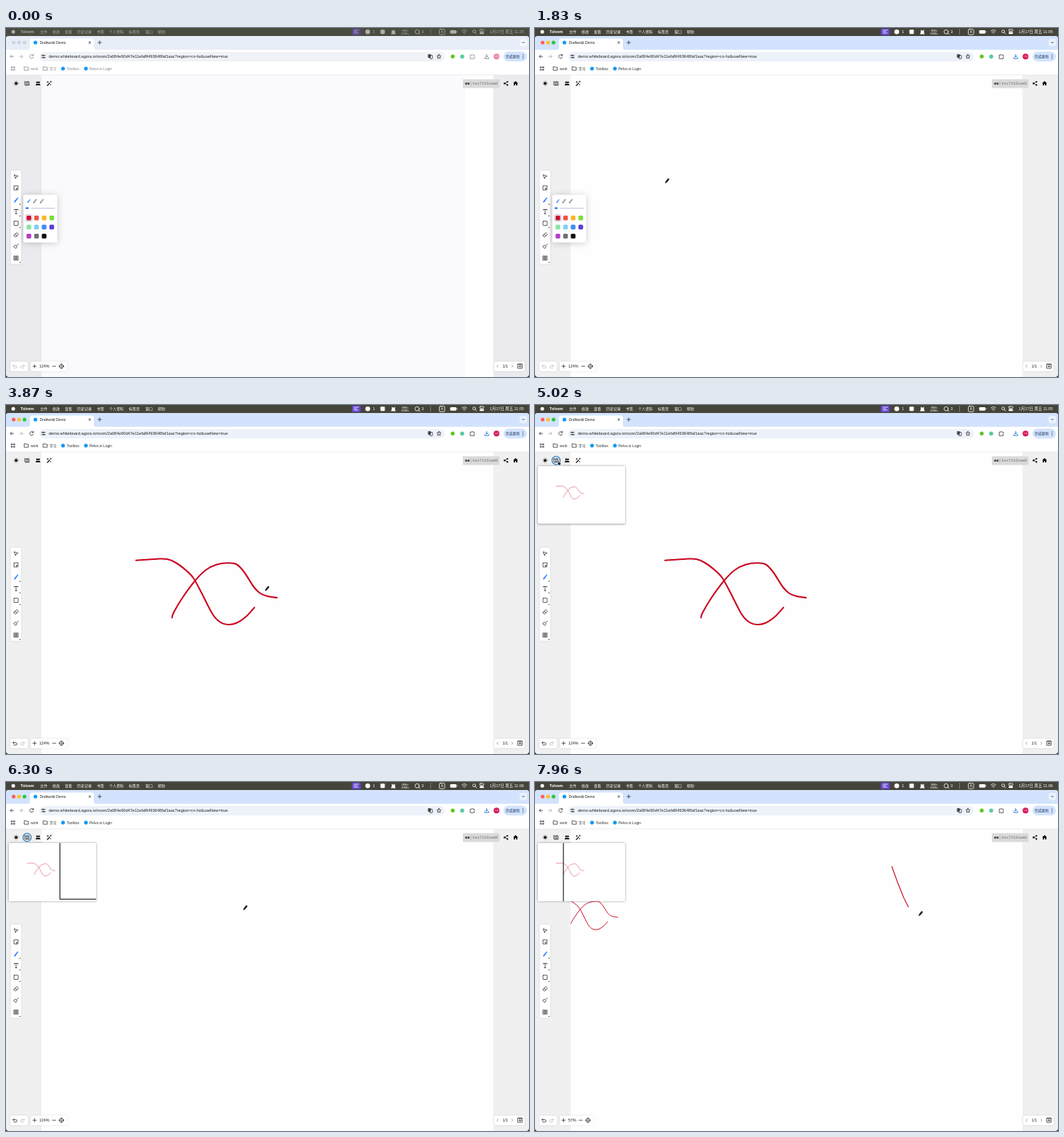
These frames come from a looping animation (720 px wide and 480 px high, 8000 ms). An HTML page:

```html
<!DOCTYPE html>
<html lang="zh">
<head>
<meta charset="utf-8">
<title>Whiteboard</title>
<style>
html, body { margin: 0; width: 100%; height: 100%; overflow: hidden; background: #222; }
svg {
  display: block; width: 720px; height: 480px;
  font: 5.4px "Liberation Sans", "Noto Sans CJK SC", sans-serif;
  --menu: #45443a; --tabs: #d3e3fd; --pill: #edf2fa; --side: #f0f0f0; --board: #fefefe;
  --ink: #303236; --dim: 1; --get: #1a66d8; --face: #d81b60;
}
svg.idle { --tabs: #e6ebf2; --pill: #eff2f7; --side: #efefef; --board: #fdfdfd; --ink: #85888c; --dim: .75; --get: #777; --face: #ee86ae; }
svg.pale { --menu: #4a4c40; --tabs: #e8eef8; --side: #ebebef; --board: #fafafd; --dim: .55; }
text { white-space: pre; }
.w { fill: #fff; }
.ink { fill: var(--ink); }
.l { fill: none; stroke: #222; stroke-width: .75; stroke-linecap: round; stroke-linejoin: round; }
.li { fill: none; stroke: var(--ink); stroke-width: .8; stroke-linecap: round; stroke-linejoin: round; }
.lw { fill: none; stroke: #fff; stroke-width: .8; stroke-linecap: round; }
.off { stroke: #bbb; }
.pen { fill: none; stroke: #cb0420; stroke-width: 2.1; stroke-linecap: round; stroke-linejoin: round; }
.panel { fill: #fff; filter: drop-shadow(0 .5px 1px #0002); }
.mono { font: 5.3px "Liberation Mono", monospace; }
.idle .lights { fill: #d0d6dd; }
</style>
</head>
<body>
<svg id="stage" viewBox="0 0 720 480" xmlns="http://www.w3.org/2000/svg">
<defs>
  <clipPath id="boardClip"><rect x="49" y="65" width="622" height="415"/></clipPath>
  <clipPath id="mapClip"><rect x="4" y="84" width="120" height="80"/></clipPath>
  <path id="pencil" d="M-1.2 3.2 2.6-2.2Q3.4-3.4 1.9-3.4L-2.4 1.4-3 3.4Z" />
</defs>
<rect width="720" height="480" fill="#222"/>
<rect width="720" height="20" fill="var(--menu)"/>

<!-- menu bar -->
<g class="w" opacity="var(--dim)" style="opacity:var(--dim)">
  <circle cx="10" cy="5.2" r="2.5"/>
  <text x="20" y="7.2" font-weight="bold">Tolvem</text>
  <g id="menus" font-size="5"></g>
  <rect x="476" y=".7" width="12.5" height="9.3" rx="2" fill="#6446c8"/>
  <path class="lw" d="M479 3h6.500M479 5h4M479 7h6"/>
  <circle cx="498" cy="5.2" r="3.3"/>
  <text x="505" y="7.2">1</text>
  <rect x="515.500" y="2.300" width="6" height="6" rx="1"/>
  <path d="M531 2l1 1.500h2.500l1-1.500v4l1 2.500h-6.500l1-2.500z"/>
  <text x="545" y="4.800" font-size="3.300">0KB/s</text>
  <text x="544" y="8.600" font-size="3.300">26KB/s</text>
  <circle class="lw" cx="566" cy="5.200" r="2.900"/><path class="lw" d="M568 7.500l2 1"/>
  <text x="572" y="7.200">3</text>
  <path class="lw" d="M584.500 2.500v.2m0 2.500v.2m0 2.500v.2" />
  <rect class="lw" x="596.500" y="1.700" width="7.500" height="7.500" rx="1.500"/>
  <text x="598.500" y="7.200">A</text>
  <rect x="611.500" y="3" width="8.500" height="4.800" rx="1.200"/><path class="lw" d="M621 4.700v1.200"/>
  <path class="lw" d="M627.600 4q3.400-3 6.800 0M629 5.800q2-1.700 4 0M630.800 7.500h.4"/>
  <circle class="lw" cx="644.500" cy="4.700" r="2"/><path class="lw" d="M646 6.300l2 2"/>
  <rect class="lw" x="652" y="2" width="6" height="2.500" rx="1.200"/><rect x="652" y="5.600" width="6" height="2.700" rx="1.300"/>
  <text x="666" y="7.200" id="clock"></text>
</g>

<!-- browser window -->
<rect y="11" width="720" height="469" rx="4" fill="var(--side)"/>
<path d="M0 30V15Q0 11 4 11H716Q720 11 720 15V30Z" fill="var(--tabs)"/>
<rect y="30" width="720" height="34.500" class="w"/>
<path d="M0 64.700H720" stroke="#e3e5e8" stroke-width=".6"/>
<circle class="lights" cx="10.500" cy="20" r="2.600" fill="#fe5f57"/>
<circle class="lights" cx="18" cy="20" r="2.600" fill="#febc2e"/>
<circle class="lights" cx="25.500" cy="20" r="2.600" fill="#28c840"/>
<path class="w" d="M30 30Q33 30 33 27V18Q33 14.500 36.500 14.500H117.500Q121 14.500 121 18V27Q121 30 124 30Z"/>
<circle cx="40.500" cy="20" r="2.600" fill="#1599f5"/>
<text x="46.500" y="21.900" font-size="5" fill="#222">Draftwold Demo</text>
<path class="l" d="M114 18.700l2.600 2.600m0-2.600l-2.600 2.600M126.700 20h4.600m-2.300-2.300v4.600"/>
<rect x="707" y="15" width="10.500" height="10" rx="3" fill="#fff8"/>
<path class="l" d="M710.800 19.300l1.500 1.500 1.500-1.500"/>

<path class="li" d="M10.500 39.200H6m2-2-2 2 2 2"/>
<path class="li" style="stroke:#aaa" d="M18.500 39.200H23m-2-2 2 2-2 2"/>
<path class="li" d="M37.500 37.700a2.600 2.600 0 1 0 .2 2.500M37.800 36v2h-2"/>
<rect x="46" y="33" width="558" height="13" rx="6.500" fill="var(--pill)"/>
<path class="l" d="M49 37.700h1m2 0h2M49 40.700h2m2 0h1"/><circle class="l" cx="51" cy="37.700" r=".8"/><circle class="l" cx="52" cy="40.700" r=".8"/>
<text x="59" y="41.100" font-size="5.620" fill="#222">demo.whiteboard.agora.io/room/2a084e90d47e11efaf9493648faf1aac?region=cn-hz&amp;useNew=true</text>
<rect x="580.800" y="36" width="4" height="5" rx=".7" fill="#555"/><rect class="l" x="583.500" y="37.500" width="3.500" height="4.800" rx=".5"/>
<path class="l" d="M596 36.300l.9 1.900 2 .2-1.500 1.400.4 2.100-1.800-1-1.800 1 .4-2.100-1.500-1.400 2-.2z"/>
<circle cx="615" cy="39.200" r="2.600" fill="#5cc51c"/>
<circle cx="628" cy="39.200" r="2.800" fill="#5bcaa4"/>
<path class="li" d="M639.500 37.200h1.700q.8-2 1.600 0h1.700v1.600q1.500.7 0 1.400v2h-5z"/>
<path d="M661.800 36v4m-1.700-1.600 1.700 1.700 1.700-1.700M659 40.300v1.700h5.600v-1.700" fill="none" stroke="var(--get)" stroke-width=".9"/>
<circle cx="675.300" cy="39.200" r="4" fill="var(--face)"/>
<text x="672.800" y="40.400" font-size="2.600" class="w">小文</text>
<rect x="685" y="32.500" width="32" height="13.500" rx="6.700" fill="#d3e3fd"/>
<text x="687.800" y="41.100" font-size="4.900" fill="#19375e">完成更新</text>
<path d="M711.800 36.800v.1m0 2.300v.1m0 2.300v.1" stroke="#19375e" stroke-width="1.200" stroke-linecap="round"/>

<!-- bookmarks -->
<path class="li" d="M7.500 53.500h1.300v1.300H7.500zm3.300 0h1.300v1.300h-1.300zm-3.300 3.300h1.300v1.300H7.500zm3.300 0h1.300v1.300h-1.300z"/>
<path class="li" d="M25.500 53.300h2l.7.800h2.700v4h-5.400zM51.500 53.300h2l.7.800h2.700v4h-5.400z"/>
<circle cx="78.500" cy="55.800" r="2.600" fill="#1599f5"/><circle cx="110" cy="55.800" r="2.600" fill="#1599f5"/>
<g class="ink" font-size="5">
  <text x="34" y="57.600">work</text><text x="60" y="57.600" font-size="4.700">学习</text>
  <text x="83.500" y="57.600">Toolbox</text><text x="114.700" y="57.600">Pelvo.io Login</text>
</g>

<!-- board -->
<rect x="49" y="65" width="622" height="415" fill="var(--board)"/>
<rect id="strip" x="632" y="65" width="39" height="415" fill="#fff"/>
<g clip-path="url(#boardClip)">
  <g id="world"><path id="wave" class="pen" pathLength="1"/><path id="hill" class="pen" pathLength="1"/></g>
  <path id="slash" class="pen" style="stroke-width:1.100" d="M491.300 116.300Q499 139 508 160L514 171.700" pathLength="1"/>
</g>

<!-- top controls -->
<g>
  <circle id="ring" cx="29" cy="76.200" r="5.600" fill="#e9f1fc" stroke="#2a78bd" stroke-width="1.200"/>
  <circle cx="14" cy="76.200" r="1.900"/><circle cx="14" cy="76.200" r="3" fill="none" stroke="#111" stroke-width="1" stroke-dasharray=".7 1.656"/>
  <path class="l" d="M26.200 73.700l1.800.7 2-.7 1.900.7v4.600l-1.900-.7-2 .7-1.800-.7zM28 74.400v4.500m2-5.200v4.500"/>
  <circle cx="42.800" cy="74.800" r="1.200"/><circle cx="45.400" cy="74.800" r="1.200"/><path d="M40.700 78.800q0-2 2-2h2.700q2 0 2 2z"/>
  <path d="M56.500 79.500l4-4" stroke="#111" stroke-width="1.300"/><path class="l" d="M57.500 73.400v1.800m-.9-.9h1.800M61.700 73v1.600m-.8-.8h1.600M61.500 77.500v1"/>
  <rect x="629" y="70.500" width="50.500" height="12" rx="1" fill="#dadada"/>
  <text class="mono" x="632" y="78.200" font-weight="bold" style="font-weight:bold">ee</text>
  <path d="M640 73.500v6" stroke="#888" stroke-width=".5"/>
  <text class="mono" x="642.300" y="78.200" fill="#777">kex7tb3owm8</text>
  <path class="l" d="M690.200 74.200l-3.700 2 3.700 2"/><circle cx="690.300" cy="74" r="1.100"/><circle cx="686.300" cy="76.200" r="1.200"/><circle cx="690.300" cy="78.400" r="1.100"/>
  <path d="M701.500 73l3.300 3h-.8v3h-1.700v-2h-1.600v2H699v-3h-.8z"/>
</g>

<!-- minimap -->
<g id="map">
  <rect x="4" y="84" width="120" height="80" class="w" style="filter:drop-shadow(0 .5px 1.500px #0006)"/>
  <g clip-path="url(#mapClip)">
    <use id="mini" href="#world"/>
    <rect id="view" fill="none" stroke="#222" stroke-width="1.200"/>
  </g>
</g>

<!-- tool column -->
<rect class="panel" x="6.500" y="196" width="14.500" height="128.500" rx="2"/>
<g class="l">
  <path d="M11.500 202l5 1.700-2.200.9-.9 2.200z"/>
  <path stroke-dasharray="1 .7" d="M16.500 219.500v-2.500h-5.500v5.800h2.500"/><path d="M14.300 220.300l2.800 1-1.300.5-.5 1.200z"/>
  <path d="M11.300 250.300v-.8h5.200v.8M13.900 249.500v6m-1 0h2"/>
  <rect x="11" y="265.700" width="5.800" height="5.800" rx=".5"/>
  <path d="M11.200 285l3-3q.8-.7 1.500 0l.9.900q.6.600 0 1.300l-3 3h-1.400l-1-1q-.6-.6 0-1.200zM12.600 283.600l2.400 2.400"/>
  <path d="M17 297l-2.500 2.500M13.300 298.800l2 2-1.800 2.500-2.800-2.500z"/>
  <path d="M11.200 313.700h2.200v2.200h-2.200zm3.300 0h2.200v2.200h-2.200zm-3.300 3.300h2.200v2.200h-2.200zm3.300 0h2.200v2.200h-2.200z"/>
</g>
<use href="#pencil" x="14" y="236.500" fill="#3381ff"/>
<path d="M19.800 241.500v1.600h-1.600zm0 16v1.600h-1.600zm0 16v1.600h-1.600zm0 48v1.600h-1.600z"/>

<!-- pen options -->
<g id="popup">
  <rect x="24" y="229.500" width="46.500" height="65.500" rx="2" class="w" style="filter:drop-shadow(0 1px 5px #0003)"/>
  <use href="#pencil" transform="translate(31.500 238) scale(.75)" fill="#3381ff"/>
  <use href="#pencil" transform="translate(40 238) scale(.7)" class="l"/>
  <use href="#pencil" transform="translate(49.300 238) scale(.7)" class="l"/>
  <rect x="28" y="246.900" width="39.500" height="2" rx="1" fill="#dcdfe6"/>
  <rect x="27" y="246.500" width="4.500" height="2.500" rx="1" fill="#3381ff"/><circle cx="32.800" cy="247.800" r="1.800" class="w"/>
  <rect x="27" y="256.700" width="9" height="9" rx="1.800" fill="#fff" stroke="#8a9bbd" stroke-width=".6"/>
  <g id="swatches"></g>
</g>

<!-- bottom bars -->
<rect class="panel" x="6" y="458.700" width="24" height="13.300" rx="2"/>
<path id="undo" class="l" d="M11 463l-1.500 1.500 1.500 1.500M9.700 464.500h3.500q2 0 2 1.700t-2 1.500h-2.500"/>
<path class="l off" d="M24.200 463l1.500 1.500-1.500 1.500M25.500 464.500H22q-2 0-2 1.700t2 1.500h2.500"/>
<rect id="zoomBox" class="panel" x="34" y="458.700" width="50" height="13.300" rx="2"/>
<path class="l" d="M37 465.200h4.600m-2.300-2.300v4.600"/>
<text id="zoom" x="45.700" y="467.200" font-size="5.500" fill="#222"></text>
<g id="zoomEnd"><path class="l" d="M64 465.200h4.500M76.300 461.800v1.700m0 3.400v1.700m-3.400-3.400h1.700m3.400 0h1.700"/><circle class="l" cx="76.300" cy="465.200" r="2.700"/><circle cx="76.300" cy="465.200" r=".7"/></g>
<rect class="panel" x="672" y="458.700" width="42" height="13.300" rx="2"/>
<path class="l" style="stroke:#888" d="M677.300 463.500l-1.500 1.700 1.500 1.700M696.300 463.500l1.500 1.700-1.500 1.700"/>
<text x="683.500" y="467.200" font-size="5.500" fill="#222">1/1</text>
<path class="l" d="M705 462.300h5.500v5.800h-5.500zM707.700 463.700v3m-1.500-1.500h3M705 462.300h5.500"/>

<!-- pointers, hot spot at 0,0 -->
<g id="arrow"><path d="M0 0v5.700l1.300-1.200.9 2 .9-.4-.9-2h1.700z" stroke="#fff" stroke-width=".4"/></g>
<g id="marker"><path d="M0 0l.7-2.800 3-3.600q.8-.9 1.700-.1t.1 1.800l-3 3.500z" fill="#1c1c1c"/></g>
<g id="hand"><path d="M0 0q.8-.5 1 .3v1.700l2 .6q.5.300.3 1.200l-.5 1.800H.5L-1 3.400q.3-.8 1 0z" stroke="#fff" stroke-width=".4"/></g>
</svg>
<script>
const $ = id => document.getElementById(id);
const show = (id, on) => $(id).style.display = on ? '' : 'none';
const move = (id, x, y, s = 1) => $(id).setAttribute('transform', `translate(${x} ${y}) scale(${s})`);
const clamp = v => Math.max(0, Math.min(1, v));
const smooth = u => u * u * (3 - 2 * u);

// keys: [time, ...values]
function track(keys, t, ease = u => u) {
  const i = keys.findIndex(k => k[0] > t);
  if (i < 0) return keys[keys.length - 1].slice(1);
  if (!i) return keys[0].slice(1);
  const a = keys[i - 1], b = keys[i], u = ease((t - a[0]) / (b[0] - a[0]));
  return a.slice(1).map((v, j) => v + (b[j + 1] - v) * u);
}

// Catmull-Rom curve through the points
function curve(p) {
  let d = 'M' + p[0];
  for (let i = 0; i < p.length - 1; i++) {
    const a = p[i - 1] || p[i], b = p[i], c = p[i + 1], e = p[i + 2] || c;
    d += 'C' + [0, 1].map(k => b[k] + (c[k] - a[k]) / 6) + ' '
       + [0, 1].map(k => c[k] - (e[k] - b[k]) / 6) + ' ' + c;
  }
  return d;
}

$('wave').setAttribute('d', curve([[179, 213.7], [208, 211.7], [222, 212], [234, 217], [248, 227.5], [258, 238],
  [269, 258], [284, 287], [294, 298], [306, 302], [318, 299.5], [331, 290.5], [342, 278.5]]));
$('hill').setAttribute('d', curve([[228.5, 292.5], [231, 285], [243, 265], [260, 242], [275, 227], [290, 219.5],
  [306, 217.3], [318, 219.5], [328, 230], [341, 250], [350, 259], [360, 263], [373, 265]]));

const menus = { 47: '文件', 64: '修改', 81: '查看', 98: '历史记录', 125: '书签', 142: '个人资料', 169: '标签页', 192: '窗口', 209: '帮助' };
$('menus').innerHTML = Object.entries(menus).map(([x, s]) => `<text x="${x}" y="7">${s}</text>`).join('');
$('swatches').innerHTML = '#c8102e #ee5348 #f8b62d #7be035 #89e5a1 #7fd0f5 #3f8cf5 #5a3ed6 #b43cc8 #707070 #111'.split(' ')
  .map((c, i) => `<rect x="${28.3 + i % 4 * 10.5}" y="${258 + (i >> 2) * 12.5}" width="6.4" height="6.4" rx="1.5" fill="${c}"/>`).join('');

const strokes = { wave: [2170, 2720], hill: [2980, 3700], slash: [7690, 7960] };
const camera = [[5750, 0, 0, 1], [5960, -76, 14, 1], [6260, -330, 16, 1], [6600, -576, 18, 1], [6820, -576, 18, 1],
  [6940, -480, 26.6, .9], [7150, -480, 26.6, .9], [7520, -57.5, 64.2, .46]];
const pointer = [[550, 300, 470], [1060, 234, 217], [1320, 200, 216], [1830, 179, 213.7], [2720, 342, 278.5],
  [2900, 230, 292.5], [2980, 228.5, 292.5], [3700, 373, 265], [3790, 373, 265], [4400, 32, 77], [5490, 32, 77],
  [5760, 326.5, 176.5], [6300, 326.5, 176.5], [6700, 375, 120.5], [7480, 375, 120.5], [7640, 491, 116]];
const slashPath = [[7640, 491, 116], [7900, 515, 172], [7960, 528, 184.5]];

function draw(t) {
  $('stage').setAttribute('class', t < 550 ? 'idle pale' : t < 1360 ? 'idle' : '');
  show('strip', t < 550);
  $('clock').textContent = '1月17日 周五 11:' + (t < 40 ? '25' : t < 5490 ? '05' : '06');
  show('popup', t < 2170);
  $('undo').classList.toggle('off', t < 2170);

  let [px, py] = t < 7640 ? track(pointer, t, smooth) : track(slashPath, t);
  for (const [id, [from, to]] of Object.entries(strokes)) {
    const el = $(id), u = clamp((t - from) / (to - from));
    show(id, u > 0);
    el.style.strokeDasharray = u < 1 ? u + ' 2' : 'none';
    if (id != 'slash' && u > 0 && u < 1) {
      const p = el.getPointAtLength(u * el.getTotalLength());
      px = p.x; py = p.y;
    }
  }

  const [x, y, s] = track(camera, t);
  move('world', x, y, s);
  const zoom = Math.round(124 * s), shift = zoom < 100 ? -3.4 : 0;
  $('zoom').textContent = zoom + '%';
  move('zoomEnd', shift, 0);
  $('zoomBox').setAttribute('width', 50 + shift);

  show('map', t >= 4450);
  show('mini', t >= 4600);
  show('ring', t >= 4400 && t < 7200);
  // the overview undoes the camera, then applies its own scale
  const k = .197, ox = -6.1, oy = 69.8;
  move('mini', ox - x * k / s, oy - y * k / s, k / s);
  const box = { x: ox + (48 - x) / s * k, y: oy + (65 - y) / s * k, width: 623 / s * k, height: 415 / s * k };
  for (const n in box) $('view').setAttribute(n, box[n]);

  const kind = t < 550 ? '' : t < 1360 ? 'arrow' : t > 4330 && t < 5530 ? 'hand' : 'marker';
  for (const id of ['arrow', 'marker', 'hand']) {
    show(id, id == kind);
    move(id, px, py);
  }
}

function loop() {
  draw(performance.now() % 8000);
  requestAnimationFrame(loop);
}
loop();
</script>
</body>
</html>
```
